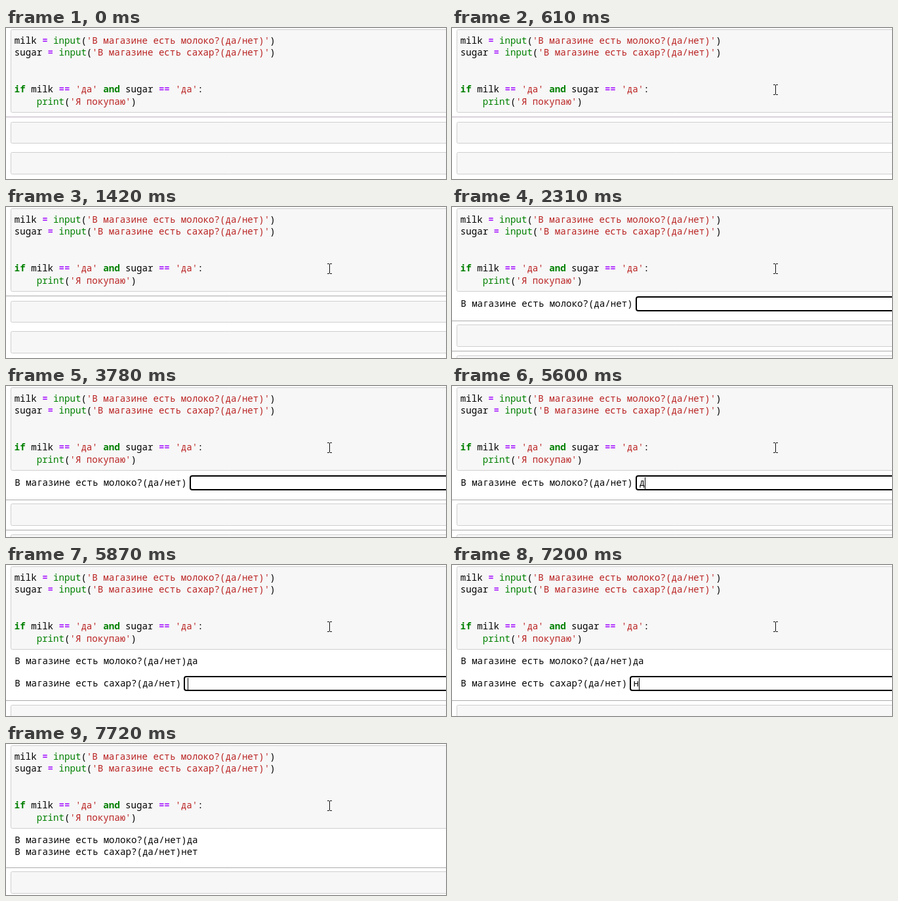
Write an HTML page with a canvas that moves like this. It is 671 by 230 pixels and loops after 8 s.

```html
<!DOCTYPE html>
<html lang="ru">
<head>
<meta charset="utf-8">
<style>
  html, body { margin: 0; width: 100%; height: 100%; overflow: hidden; background: #fff; }
  canvas { display: block; }
</style>
</head>
<body>
<canvas id="stage" width="671" height="230"></canvas>
<script>
const ctx = document.getElementById('stage').getContext('2d');
const W = 671, H = 230, LOOP = 8000;
const CHAR = 8.465, LEFT = 12.8;
const FONT = '14.11px "Noto Sans Mono", "DejaVu Sans Mono", monospace';

const STYLES = {
  text: ['#000', ''],
  fn: ['#008000', ''],
  key: ['#008000', 'bold '],
  op: ['#aa22ff', 'bold '],
  str: ['#ba2121', '']
};

const ASK_MILK = 'В магазине есть молоко?(да/нет)';
const ASK_SUGAR = 'В магазине есть сахар?(да/нет)';

const ask = (name, question) => [
  ['text', name + ' '], ['op', '='], ['text', ' '], ['fn', 'input'],
  ['text', '('], ['str', `'${question}'`], ['text', ')']
];
const isYes = name => [
  ['text', ` ${name} `], ['op', '=='], ['text', ' '], ['str', "'да'"]
];

const CODE = [
  [24, ask('milk', ASK_MILK)],
  [42, ask('sugar', ASK_SUGAR)],
  [98, [['key', 'if'], ...isYes('milk'), ['text', ' '], ['key', 'and'],
        ...isYes('sugar'), ['text', ':']]],
  [117, [['text', '    '], ['fn', 'print'], ['text', '('],
         ['str', "'Я покупаю'"], ['text', ')']]]
];

// [start time, typed text, caret shown]
const MILK_KEYS = [
  [1770, '', true], [2310, '', false], [2850, '', true],
  [2990, 'L', true], [3250, 'Lf', true], [3650, 'L', true],
  [3715, '', true], [3780, '', false], [4340, 'Д', true],
  [4820, 'Да', true], [5240, 'Д', true], [5380, '', true],
  [5600, 'д', true], [5660, 'да', true]
];
const SUGAR_KEYS = [
  [5870, '', true], [6400, '', false], [6940, '', true],
  [7200, 'н', true], [7330, 'не', true], [7460, 'нет', true]
];

function print(str, x, y, style = 'text') {
  const [color, weight] = STYLES[style];
  ctx.font = weight + FONT;
  ctx.fillStyle = color;
  ctx.fillText(str, x, y);
}

function printTokens(tokens, y) {
  let col = 0;
  for (const [style, str] of tokens) {
    print(str, LEFT + col * CHAR, y, style);
    col += str.length;
  }
}

function box(x, y, h, fill, stroke, line, radius) {
  ctx.beginPath();
  ctx.roundRect(x, y, W + 20, h, radius);
  ctx.fillStyle = fill;
  ctx.fill();
  ctx.strokeStyle = stroke;
  ctx.lineWidth = line;
  ctx.stroke();
}

const cell = (y, h = 33) => box(7.5, y + 0.5, h, '#f7f7f7', '#cfcfcf', 1, 2);

function rule(y, color = '#ababab') {
  ctx.fillStyle = color;
  ctx.fillRect(0, y, W, 1);
}

function prompt(question, x, y, keys, t) {
  const [, typed, caret] = keys.filter(k => k[0] <= t).pop();
  print(question, LEFT + 0.4, y + 16);
  box(x + 1, y + 1, 21, '#fff', '#000', 2, 3);
  print(typed, x + 5.5, y + 16);
  if (caret) {
    ctx.fillStyle = '#000';
    ctx.fillRect(Math.round(x + 6 + typed.length * CHAR), y + 3, 1, 18);
  }
}

function pointer(t) {
  if (t < 200) return;
  const step = Math.min(6, Math.floor((t - 200) / 68.3));
  const away = Math.pow(1 - step / 6, 1.5);
  const x = Math.round(493 + 129 * away), y = Math.round(86 + 134 * away);
  ctx.fillStyle = '#111';
  ctx.fillRect(x, y + 1, 1, 14);
  for (const edge of [y, y + 15]) {
    ctx.fillRect(x - 3, edge, 3, 1);
    ctx.fillRect(x + 1, edge, 3, 1);
  }
}

function output(t) {
  if (t < 1770) {
    rule(135, t < 880 ? '#b9adb9' : '#ababab');
    cell(143, 32);
    cell(189);
  } else if (t < 5870) {
    prompt(ASK_MILK, 280, 136, MILK_KEYS, t);
    rule(173);
    cell(179);
    rule(219);
    cell(226);
  } else {
    print(ASK_MILK + 'да', LEFT + 0.4, 151);
    if (t < 7720) {
      prompt(ASK_SUGAR, 271, 169, SUGAR_KEYS, t);
      rule(206);
      cell(213);
    } else {
      print(ASK_SUGAR + 'нет', LEFT + 0.4, 169);
      rule(188);
      cell(194);
    }
  }
}

function draw(t) {
  ctx.fillStyle = '#fff';
  ctx.fillRect(0, 0, W, H);
  cell(2, 126);
  for (const [y, tokens] of CODE) printTokens(tokens, y);
  output(t);
  pointer(t);
}

const start = performance.now();
function tick() {
  draw((performance.now() - start) % LOOP);
  requestAnimationFrame(tick);
}
tick();
</script>
</body>
</html>
```
